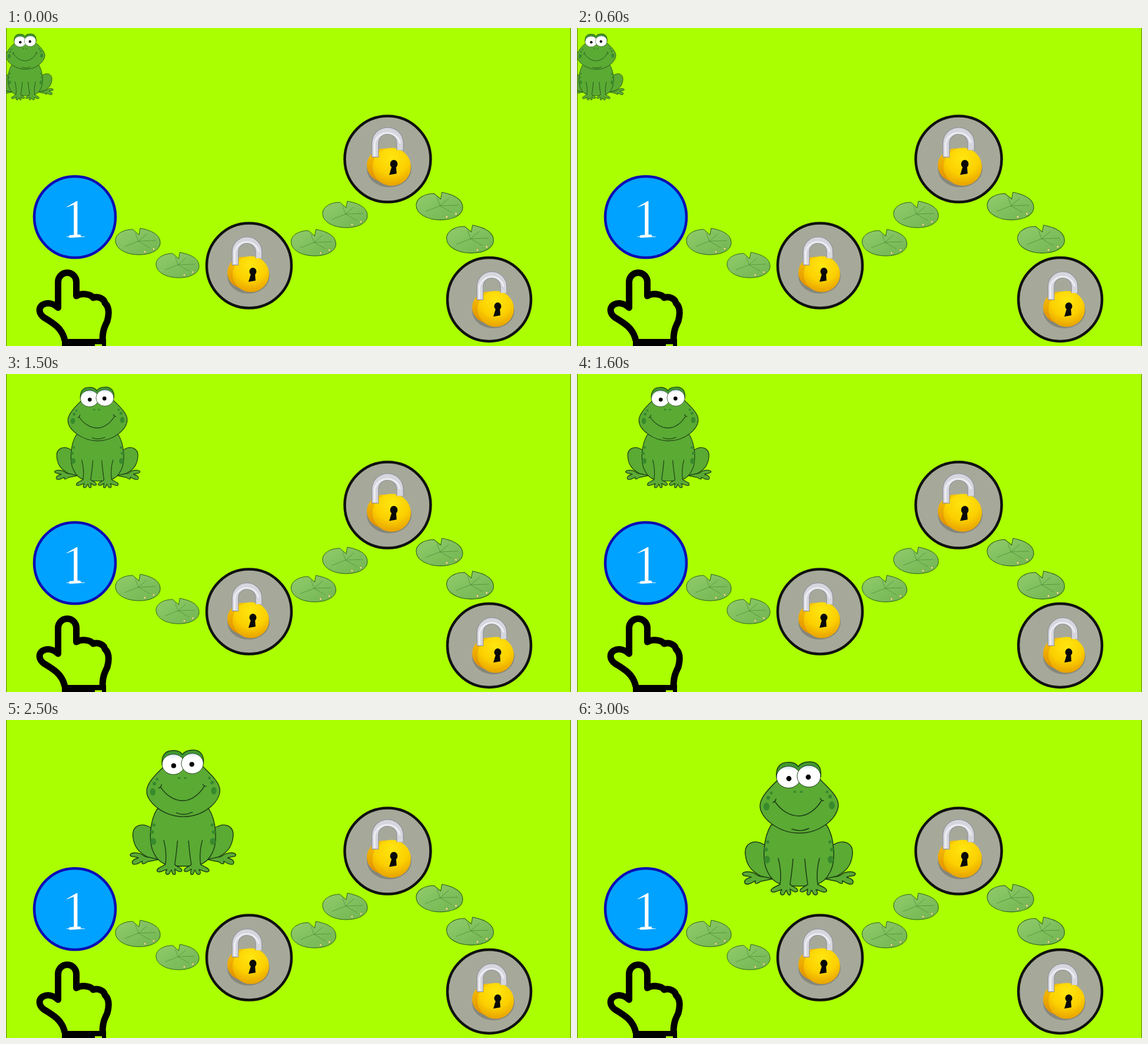
Write an HTML page that moves like this. It is 960x540 px and loops after 3600 ms.

```html
<!DOCTYPE html>
<html lang="en">
<head>
<meta charset="utf-8">
<title>Frog level map</title>
<style>
  html, body { margin: 0; width: 100%; height: 100%; overflow: hidden; background: #af0; }
  svg { display: block; width: 960px; height: 540px; }
  text { font: 95px "Liberation Serif", "Times New Roman", serif; text-anchor: middle; }
</style>
</head>
<body>
<svg viewBox="0 0 960 540">
  <defs>
    <linearGradient id="leaf" x2="1" y2="1">
      <stop stop-color="#92cb6c"/><stop offset="1" stop-color="#70b550"/>
    </linearGradient>
    <radialGradient id="gold" cx=".5" cy=".25" r=".8">
      <stop stop-color="#ffe610"/><stop offset=".55" stop-color="#fcd000"/><stop offset="1" stop-color="#e59a00"/>
    </radialGradient>
    <linearGradient id="brass" x2="0" y2="1">
      <stop stop-color="#f8c400"/><stop offset="1" stop-color="#e08c00"/>
    </linearGradient>
    <linearGradient id="eye" x2="0" y2="1">
      <stop stop-color="#cfe2ee"/><stop offset=".2" stop-color="#fff"/>
    </linearGradient>

    <!-- Lily pad, centred on 0,0 -->
    <g id="pad" stroke-linecap="round" stroke-linejoin="round">
      <path d="M-9-21 C-25-21-38-13-38-2 C-38 12-20 22 2 22 C24 22 38 13 38 2 C38-9 30-18 4-23 L2-12Z"
            fill="url(#leaf)" stroke="#2c5c20" stroke-width="1"/>
      <path d="M1-1 L-4-14 M1-1 L15-13 M1-1 L30-2 M1-1 L20 10 M1-1 L-22 8"
            fill="none" stroke="#4a8a38" stroke-width=".7"/>
      <g fill="#f2eaa0" stroke="#94843a" stroke-width=".5">
        <circle cx="12" cy="17" r="1.8"/><circle cx="27" cy="12" r="1.8"/>
      </g>
    </g>

    <g id="lock">
      <ellipse cx="412" cy="421" rx="36" ry="30" fill="#000" opacity=".2"/>
      <ellipse cx="405" cy="415.500" rx="29" ry="27" fill="url(#brass)"/>
      <ellipse cx="416" cy="418" rx="31" ry="30.500" fill="url(#gold)"/>
      <g fill="none">
        <path id="shackle" d="M389.500 403 V380 A20 20 0 0 1 429.500 380 V391" stroke="#8c8c98" stroke-width="11.500"/>
        <path d="M389.500 402 V380 A20 20 0 0 1 429.500 380 V391" stroke="#d6d6de" stroke-width="9.500"/>
        <path d="M388.500 401 V380 A21 21 0 0 1 429.500 380" stroke="#ececf2" stroke-width="3"/>
      </g>
      <path d="M416 418 L412 431 L424 429 L423 416Z" fill="#080808"/>
      <ellipse cx="419.500" cy="413.500" rx="6" ry="6.500" fill="#080808"/>
    </g>

    <!-- One side of the frog's body -->
    <g id="hind">
      <path d="M332 268 C322 264 312 269 304 262 C298 257 284 256 281 261 C281 266 290 264 296 267 C288 269 282 273 286 278 C292 281 298 275 303 273 C301 279 306 279 312 274 L332 270"/>
      <path d="M320 213 C300 200 284 210 286 228 C288 250 300 258 312 265 L334 270Z"/>
    </g>
    <g id="front">
      <path d="M342 235 C346 250 347 265 345 279 C338 283 328 286 330 291 C335 295 341 289 348 288 C344 292 345 297 349 297 C354 297 353 290 356 289 C357 293 358 298 362 297 C365 295 362 290 362 287 C366 291 373 294 375 290 C375 284 365 283 362 279 C364 265 366 250 367 236"/>
      <g fill="#388a2c" stroke="none">
        <ellipse cx="323" cy="237" rx="5" ry="6.500"/><circle cx="321" cy="220" r="3.300"/><circle cx="324" cy="207" r="2.800"/>
      </g>
    </g>
    <g id="cheek" fill="#388a2c" stroke="none">
      <ellipse cx="322" cy="147" rx="5" ry="6.800"/><circle cx="325" cy="132" r="3.300"/><circle cx="330" cy="124" r="2.500"/>
    </g>
  </defs>

  <rect width="960" height="540" fill="#af0"/>

  <!-- The rim in the button's blue slims the digit -->
  <circle cx="117" cy="321" r="69" fill="#00a2ff" stroke="#0c0cb4" stroke-width="4.500"/>
  <text x="117" y="356" fill="#fff" stroke="#00a2ff" stroke-width="1.800">1</text>
  <path d="M109 354 L125 353" stroke="#fff" stroke-width="4.500" stroke-linecap="round"/>

  <path d="M100 531 C96 510 80 501 65 492 C55 485 55 475 62 470 C71 465 81 468 88.500 475 V431 A15.500 15.500 0 0 1 119.500 431 V455 C128 450 143 451 148 458 C157 455 167 460 168 467 C176 474 175 487 172 498 C167 508 164 515 164 531"
        fill="none" stroke="#000" stroke-width="11" stroke-linejoin="round"/>
  <path d="M95 528 H170 V540 H163 V537 H151 V540 H95Z"/>

  <g fill="#a6a99a" stroke="#101210" stroke-width="4.500">
    <circle cx="413" cy="403.500" r="72"/>
    <circle cx="648.500" cy="222.500" r="73"/>
    <circle cx="821" cy="461" r="71"/>
  </g>
  <use href="#lock"/>
  <use href="#lock" transform="translate(216 -205.700) scale(1.056)"/>
  <use href="#lock" transform="translate(416 59)"/>

  <use href="#pad" x="224" y="363"/>
  <use href="#pad" transform="translate(291.500 403) scale(.96)"/>
  <use href="#pad" x="522.500" y="365"/>
  <use href="#pad" x="576" y="317"/>
  <use href="#pad" transform="translate(736.500 303) scale(1.040)"/>
  <use href="#pad" transform="translate(788.500 359) scale(1.050)"/>

  <g id="frog" fill="#5aaa34" stroke="#1c3c14" stroke-width="1.500" stroke-linecap="round" stroke-linejoin="round">
    <use href="#hind"/>
    <use href="#hind" transform="translate(754) scale(-1 1)"/>
    <path d="M330 178 C316 200 314 240 324 258 C335 282 355 282 377 282 C399 282 419 282 430 258 C440 240 438 200 424 178Z"/>
    <use href="#front"/>
    <use href="#front" transform="translate(754) scale(-1 1)"/>
    <path d="M342 101 C330 113 311 130 311 146 C311 166 342 192 378 192 C414 192 444 166 444 144 C444 129 424 112 412 100Z"/>
    <path d="M339 98 C337 80 346 72 357 72 C368 71 373 75 376 79 C380 73 386 71 396 71 C408 71 416 80 414 96Z" fill="#3f982f"/>
    <use href="#cheek"/>
    <use href="#cheek" transform="translate(755 -2) scale(-1 1)"/>
    <g fill="url(#eye)" stroke-width="1">
      <ellipse cx="359.500" cy="97" rx="20.500" ry="18.500"/>
      <ellipse cx="394" cy="95.500" rx="20" ry="18.500"/>
    </g>
    <g fill="#000" stroke="none">
      <circle cx="360" cy="99.500" r="4.400"/><circle cx="393" cy="97" r="4.400"/>
    </g>
    <g fill="#388a2c" stroke="none">
      <ellipse cx="370" cy="122" rx="2.600" ry="2"/><ellipse cx="381" cy="122" rx="2.600" ry="2"/>
    </g>
    <path d="M336 138 C347 155 363 163 377 163 C391 163 406 153 416 136 M333 140 Q337 139 338 134 M413 133 Q415 137 419 137 M365 185 Q379 191 394 184" fill="none"/>
  </g>

  <path d="M.5 0 V540 M959.500 0 V540" stroke="#578300"/>
</svg>
<script>
  // Each pose: start time, left, top, scale
  const poses = [
    [0, -15, 10, .497],
    [1000, 63, 26, .497],
    [1500, 82.500, 22, .757],
    [2000, 157, 39, .757],
    [2500, 211, 51, .935],
    [3000, 281, 71, 1]
  ];
  const frog = document.getElementById("frog");
  const begin = performance.now();

  function draw(now) {
    const t = Math.max(0, now - begin) % 3600;
    const [, x, y, s] = poses.findLast(pose => pose[0] <= t);
    frog.setAttribute("transform", `translate(${x} ${y}) scale(${s}) translate(-281 -71)`);
    requestAnimationFrame(draw);
  }
  draw(begin);
</script>
</body>
</html>
```
